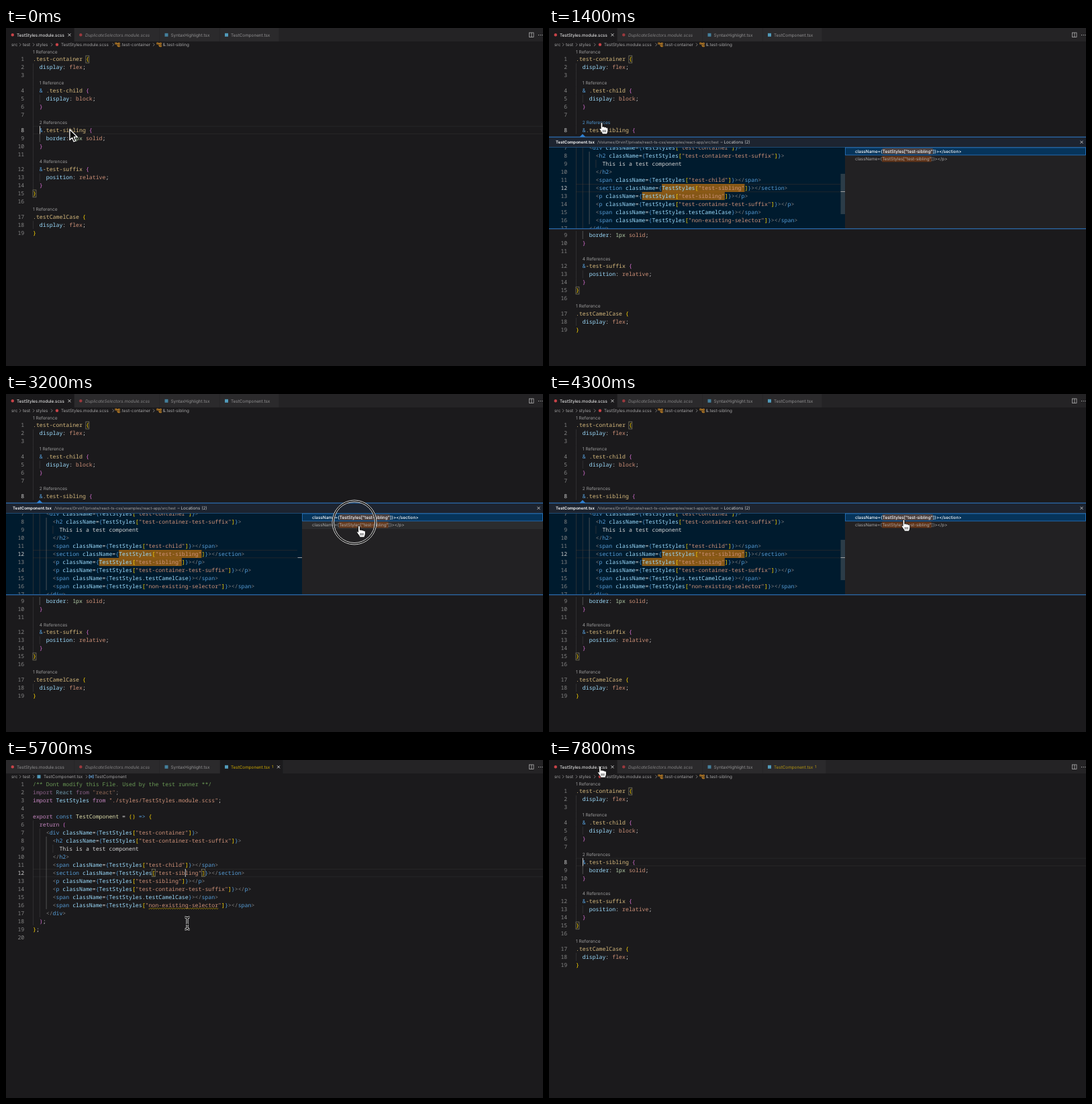
Write an HTML page with a canvas that moves like this. It is 800x503 px and loops after 8000 ms.

```html
<!DOCTYPE html>
<html lang="en">
<head>
<meta charset="utf-8">
<title>Peek references</title>
<style>
  html, body { margin: 0; width: 100%; height: 100%; overflow: hidden; background: #1b1a1c; }
  canvas { display: block; width: 100vw; height: 100vh; }
</style>
</head>
<body>
<canvas></canvas>
<script>
const W = 800, H = 503, LOOP = 8000;
const LINE = 12, LENS = 10.6, COL = 4.93, LEFT = 40, PEEK_GAP = 144.2;
const PEEK_OPEN = 1000, PEEK_FOCUS = 5200, FILE_OPEN = 5600, FILE_BACK = 7600;
const CLICKS = [800, 2800, 5200, 7100];
const MONO = '8.22px "Noto Sans Mono", monospace';
const BG = '#1b1a1c', BLUE = '#2f7fd0';

const canvas = document.querySelector('canvas');
const ctx = canvas.getContext('2d');
const ratio = window.devicePixelRatio || 1;
canvas.width = W * ratio;
canvas.height = H * ratio;
ctx.scale(ratio, ratio);
ctx.textRendering = 'geometricPrecision';

// Code is marked up with ^ and a colour letter.
const COLORS = {
  s: '#d7ba7d', k: '#569cd6', p: '#9cdcfe', v: '#ce9178', n: '#b5cea8', w: '#d4d4d4',
  y: '#ffd700', m: '#da70d6', g: '#808080', c: '#6a9955', i: '#c586c0', f: '#dcdcaa',
  I: '#8d628a', P: '#719caf', V: '#936a57', W: '#979797'
};

// Rows that start with @ are reference lenses and carry no line number.
const STYLES = [
  '@1 Reference',
  '^s.test-container ^y{',
  '  ^pdisplay^w: ^vflex^w;',
  '',
  '  @1 Reference',
  '  ^k& ^s.test-child ^m{',
  '    ^pdisplay^w: ^vblock^w;',
  '  ^m}',
  '',
  '  @2 References',
  '  ^k&^s.test-sibling ^m{',
  '    ^pborder^w: ^n1px ^vsolid^w;',
  '  ^m}',
  '',
  '  @4 References',
  '  ^k&^s-test-suffix ^m{',
  '    ^pposition^w: ^vrelative^w;',
  '  ^m}',
  '^y}',
  '',
  '@1 Reference',
  '^s.testCamelCase ^y{',
  '  ^pdisplay^w: ^vflex^w;',
  '^y}'
];

const key = name => `^y[^v"${name}"^y]`;
const open = (tag, access) => `^g<^k${tag} ^pclassName^w=^k{^pTestStyles${access}^k}^g>`;
const close = tag => `^g</^k${tag}^g>`;
const element = (tag, access) => '      ' + open(tag, access) + close(tag);

const COMPONENT = [
  '^c/** Dont modify this File. Used by the test runner **/',
  '^Iimport ^PReact ^Ifrom ^V"react"^W;',
  '^iimport ^pTestStyles ^ifrom ^v"./styles/TestStyles.module.scss"^w;',
  '',
  '^iexport ^kconst ^fTestComponent ^w= ^y() ^k=> ^y{',
  '  ^ireturn ^m(',
  '    ' + open('div', key('test-container')),
  '      ' + open('h2', key('test-container-test-suffix')),
  '        ^wThis is a test component',
  '      ' + close('h2'),
  element('span', key('test-child')),
  element('section', key('test-sibling')),
  element('p', key('test-sibling')),
  element('p', key('test-container-test-suffix')),
  element('span', '^w.^ptestCamelCase'),
  element('span', key('non-existing-selector')),
  '    ' + close('div'),
  '  ^m)^w;',
  '^y}^w;',
  ''
];

function rect(x, y, w, h, color) {
  ctx.fillStyle = color;
  ctx.fillRect(x, y, w, h);
}

function frame(x, y, w, h, color) {
  ctx.strokeStyle = color;
  ctx.lineWidth = 0.7;
  ctx.strokeRect(x, y, w, h);
}

function lines(color, width, ...paths) {
  ctx.strokeStyle = color;
  ctx.lineWidth = width;
  ctx.beginPath();
  for (const [x, y, ...rest] of paths) {
    ctx.moveTo(x, y);
    for (let i = 0; i < rest.length; i += 2) ctx.lineTo(rest[i], rest[i + 1]);
  }
  ctx.stroke();
}

function label(text, x, y, color, size = 6.35, style = '') {
  ctx.font = `${style} ${size}px Inter, sans-serif`;
  ctx.fillStyle = color;
  ctx.fillText(text, x, y + size * 0.36);
  return x + ctx.measureText(text).width;
}

function cross(x, y, color) {
  lines(color, 0.9, [x - 2, y - 2, x + 2, y + 2], [x + 2, y - 2, x - 2, y + 2]);
}

function codeLine(row, x, y) {
  const [indent, ...tokens] = row.split('^');
  let col = indent.length;
  ctx.font = MONO;
  for (const token of tokens) {
    ctx.fillStyle = COLORS[token[0]];
    ctx.fillText(token.slice(1), x + col * COL, y + 2.7);
    col += token.length - 1;
  }
}

function lineNumber(n, y, active) {
  ctx.font = MONO;
  ctx.textAlign = 'right';
  ctx.fillStyle = active ? '#d0d0d0' : '#858585';
  ctx.fillText(n, 27.3, y + 2.7);
  ctx.textAlign = 'left';
}

function guides(depth, top, height, bright) {
  for (let i = 0; i < depth; i++)
    rect(LEFT + i * 2 * COL, top, 0.7, height, i === bright ? '#666' : '#39383a');
}

const bracketBox = (col, y) => frame(LEFT + col * COL, y - 5.4, COL, 10.8, '#858268');
const caret = (x, y) => rect(x, y - 6, 1, 12, '#c8c8c8');

function currentLine(y, right) {
  rect(LEFT, y - 6, right - LEFT, 0.7, '#2b2a2c');
  rect(LEFT, y + 5.5, right - LEFT, 0.7, '#2b2a2c');
}

function stylesEditor(peek, hoverLens, caretOn) {
  let top = 30, number = 0, depth = 0;
  for (const row of STYLES) {
    const isLens = row.trim()[0] === '@';
    const height = isLens ? LENS : LINE;
    const y = top + height / 2;
    if (row) depth = row.search(/\S/) / 2;
    if (!isLens) number++;
    if (number === 8 && !isLens && !peek) currentLine(y, W);
    guides(depth, top, height, number === 9 ? 1 : -1);
    if (isLens) {
      const hovered = hoverLens && row.includes('2 R');
      label(row.trim().slice(1), LEFT + depth * 2 * COL, y, hovered ? '#4e94ce' : '#999', 6.65);
    } else {
      lineNumber(number, y, number === 8);
      if (number === 1) bracketBox(16, y);
      if (number === 15) bracketBox(0, y);
      codeLine(row, LEFT, y);
      if (number === 8 && caretOn) caret(50, y);
    }
    top += height;
    if (peek && number === 8 && !isLens) top += PEEK_GAP;
  }
}

function squiggle(x, y, width) {
  ctx.strokeStyle = '#cca700';
  ctx.lineWidth = 0.7;
  ctx.beginPath();
  for (let i = 0; i <= width; i += 0.5) ctx.lineTo(x + i, y + 0.8 * Math.sin(i * 1.8));
  ctx.stroke();
}

function componentEditor(firstY, right, focused, caretOn, matches) {
  let depth = 0;
  COMPONENT.forEach((row, i) => {
    const number = i + 1, y = firstY + i * LINE;
    depth = row ? row.search(/\S/) / 2 : 0;
    if (number === 12) currentLine(y, right);
    guides(depth, y - 6, LINE, 2);
    const matchCol = { 12: 26, 13: 20 }[number];
    if (matches && matchCol)
      rect(LEFT + matchCol * COL, y - 6, 25 * COL, LINE, 'rgba(255,143,0,.52)');
    lineNumber(number, y, number === 12);
    if (number === 12 && focused) {
      bracketBox(36, y);
      bracketBox(51, y);
    }
    codeLine(row, LEFT, y);
    if (number === 12 && caretOn) caret(LEFT + 46 * COL, y);
    if (number === 16 && focused) squiggle(LEFT + 35 * COL, y + 5, 21 * COL);
  });
}

function resultRow(y, tag, color, style) {
  const head = label('className={', 456, y, color, 6.4, style);
  const match = 'TestStyles["test-sibling"';
  rect(head, y - 4.5, ctx.measureText(match).width, 9, 'rgba(234,92,0,.3)');
  const tail = label(match, head, y, color, 6.4, style);
  label(`]}></${tag}>`, tail, y, color, 6.4, style);
}

function peekView(t) {
  const focused = t >= PEEK_FOCUS;
  ctx.fillStyle = BLUE;
  ctx.beginPath();
  ctx.moveTo(45.5, 162.2);
  ctx.lineTo(50, 157.8);
  ctx.lineTo(54.5, 162.2);
  ctx.fill();
  rect(0, 162, W, 137, '#1d2430');
  label('TestComponent.tsx', 10, 169.8, '#fff', 6.1, '600');
  label('/Volumes/OrvinT/private/react-ts-css/examples/react-app/src/test', 72, 169.8, '#a0a0a0', 5.75);
  label('– Locations (2)', 255.5, 169.8, '#ccc', 6.3);
  cross(793.5, 169.8, '#ccc');

  ctx.save();
  ctx.beginPath();
  ctx.rect(0, 177.5, 441, 121);
  ctx.clip();
  rect(0, 177, 441, 122, '#001b2e');
  componentEditor(106, 434, focused, false, true);
  if (t < 2300 || t > 3400) rect(434.5, 217, 6.5, 60, 'rgba(121,121,121,.36)');
  rect(434.5, 243, 6.5, 1, '#a0a0a0');
  if (focused) rect(437, 267, 4, 6, '#b58a22');
  ctx.restore();

  rect(441, 177, 359, 122, '#222123');
  rect(441, 177.7, 359, 11.6, focused ? '#37363b' : '#06345a');
  if (t > 2500 && t < 4000) rect(441, 189.5, 359, 11.5, '#2b2c2e');
  rect(0, 161.7, W, 1, BLUE);
  rect(0, 177, W, 0.8, '#225785');
  rect(0, 298.3, W, 1, BLUE);
  if (!focused) frame(441.5, 178, 358, 11, BLUE);
  resultRow(183.3, 'section', focused ? '#ccc' : '#fff', focused ? '' : '500');
  resultRow(194.8, 'p', '#aaa', '');
}

function dot(x, y, color) {
  ctx.fillStyle = color;
  ctx.beginPath();
  ctx.arc(x, y, 2.2, 0, Math.PI * 2);
  ctx.fill();
}

function tabs(component, warned) {
  const end = warned ? 413 : 407;
  rect(0, 0, W, 20, '#242325');
  const cells = [[0, 102, !component], [102, 229], [229, 319], [319, end, component]];
  for (const [left, right, active] of cells)
    rect(left, 0, right - left - 0.6, 20, active ? BG : '#2b2a2c');
  dot(9.8, 10.3, '#c74348');
  dot(111.3, 10.3, '#9b393e');
  rect(236.5, 7.8, 5, 5, '#447f9b');
  rect(326, 7.8, 5, 5, '#519aba');
  label('TestStyles.module.scss', 16, 10.3, component ? '#929192' : '#fff');
  label('DuplicateSelectors.module.scss', 118, 10.3, '#858485', 6.35, 'italic');
  label('SyntaxHighlight.tsx', 245.5, 10.3, '#929192');
  const color = warned ? (component ? '#cca700' : '#b39410') : '#929192';
  label('TestComponent.tsx', 335, 10.3, color);
  if (warned) label('1', 396, 10.3, color, 5.8);
  component ? cross(406, 10.3, '#ddd') : cross(94.5, 10.3, '#ddd');
  frame(779.5, 7, 6.5, 6.5, '#c5c5c5');
  lines('#c5c5c5', 0.7, [782.8, 7, 782.8, 13.5]);
  for (const x of [793, 795.7, 798.4]) rect(x, 10, 1, 1, '#c5c5c5');
}

function selectorIcon(x) {
  lines('#ee9d28', 0.8, [x - 1, 23, x + 1.5, 23], [x, 23, x, 27, x + 1.5, 27]);
  for (const [dx, dy] of [[-2.2, 23], [2.3, 23.2], [2.3, 26.8]]) frame(x + dx - 1, dy - 1, 2, 2, '#ee9d28');
}

function variableIcon(x) {
  const c = '#75beff';
  lines(c, 0.8, [x - 2, 22.5, x - 3, 22.5, x - 3, 27, x - 2, 27], [x + 2, 22.5, x + 3, 22.5, x + 3, 27, x + 2, 27]);
  frame(x - 1, 23.8, 2, 2, c);
}

function breadcrumbs(component) {
  const parts = component
    ? [[8, 'src'], [25, 'test'], [56, 'TestComponent.tsx'], [132, 'TestComponent']]
    : [[8, 'src'], [25, 'test'], [44.5, 'styles'], [82, 'TestStyles.module.scss'],
       [171, '.test-container'], [233.5, '&.test-sibling']];
  for (const [x, text] of parts) label(text, x, 24.7, '#a5a4a5');
  const chevrons = component ? [21, 41, 120] : [21, 41, 68, 159.5, 220];
  for (const x of chevrons) lines('#888', 0.8, [x - 1, 22.5, x + 1.2, 24.8, x - 1, 27.1]);
  if (component) {
    rect(46.5, 22.3, 5, 5, '#519aba');
    variableIcon(127);
  } else {
    dot(76, 24.7, '#c74348');
    selectorIcon(166);
    selectorIcon(228);
  }
}

// Pointer keyframes: time, x, y of the hot spot.
const PATH = [
  [0, 95, 151], [300, 95, 151], [800, 78.5, 140.7], [1600, 78.5, 140.7], [2700, 519, 191], [2800, 519, 191],
  [3200, 526, 196], [3700, 529, 193], [4300, 528.5, 187], [4500, 528.5, 187], [5150, 268, 240],
  [5250, 268, 240], [5400, 270, 243], [5800, 270, 243], [6700, 147.5, 0], [7100, 76, 9], [8000, 76, 9]
];

function pointerAt(t) {
  const i = Math.max(1, PATH.findIndex(p => p[0] >= t));
  const [t0, x0, y0] = PATH[i - 1], [t1, x1, y1] = PATH[i];
  const u = (t - t0) / (t1 - t0), e = u * u * (3 - 2 * u);
  return [x0 + (x1 - x0) * e, y0 + (y1 - y0) * e];
}

const ARROW = new Path2D('M0 0V15.5L3.6 12.2L6 18L8.7 16.8L6.3 11.2H11.3Z');
const HAND = new Path2D('M-1.4 1.5C-1.4-.5 1.4-.5 1.4 1.5V6.5C2.2 5.6 4.1 5.8 4.3 7C5.2 6.3 6.8 6.6 7 7.8' +
  'C8 7.2 9.4 7.8 9.4 9.2V12C9.4 14 8.4 15 8 17.2H1C.6 15-1.4 13-3 10.5C-4 8.9-2.6 8-1.6 9L-1.4 9.4Z');
const IBEAM = new Path2D('M-3.5-9Q0-9 0-6.5Q0-9 3.5-9M0-6.5V6.5M-3.5 9Q0 9 0 6.5Q0 9 3.5 9M-2 1.5H2');

function pointer(t) {
  const [x, y] = pointerAt(t);
  const kind = [[700, 'arrow'], [1750, 'hand'], [2450, 'arrow'], [4700, 'hand'],
    [6500, 'ibeam'], [6850, 'arrow'], [LOOP, 'hand']].find(([end]) => t < end)[1];
  ctx.save();
  ctx.translate(x, y);
  ctx.lineJoin = 'round';
  if (kind === 'ibeam') {
    ctx.strokeStyle = '#fff';
    ctx.lineWidth = 3;
    ctx.stroke(IBEAM);
    ctx.strokeStyle = '#000';
    ctx.lineWidth = 1.3;
    ctx.stroke(IBEAM);
  } else {
    const arrow = kind === 'arrow';
    const path = arrow ? ARROW : HAND;
    ctx.fillStyle = arrow ? '#000' : '#fff';
    ctx.strokeStyle = arrow ? '#fff' : '#000';
    ctx.lineWidth = arrow ? 1.3 : 0.9;
    ctx.fill(path);
    ctx.stroke(path);
    if (!arrow) lines('#000', 0.7, [2, 11, 2, 14.5], [4, 11, 4, 14.5], [6, 11, 6, 14.5]);
  }
  ctx.restore();
}

function clickRing(t) {
  const start = CLICKS.find(c => t >= c && t - c < 450);
  if (start === undefined) return;
  const [x, y] = pointerAt(start);
  const radius = Math.min(33, 4 + (t - start) * 0.0725);
  const circle = (r, width, color) => {
    ctx.strokeStyle = color;
    ctx.lineWidth = width;
    ctx.beginPath();
    ctx.arc(x, y, r, 0, Math.PI * 2);
    ctx.stroke();
  };
  circle(radius - 1.2, 3, '#111');
  circle(radius, 0.9, '#eee');
  circle(radius - 2.5, 0.9, '#eee');
}

function draw(t) {
  const component = t >= FILE_OPEN && t < FILE_BACK;
  const peek = t >= PEEK_OPEN && t < FILE_OPEN;
  const blinkStart = component ? FILE_OPEN : t >= FILE_BACK ? FILE_BACK : 0;
  const caretOn = !peek && (t - blinkStart) % 1000 < 500;
  rect(0, 0, W, H, BG);
  if (component) componentEditor(36, W, true, caretOn, false);
  else stylesEditor(peek, t > 700 && t < 1700, caretOn);
  if (peek) peekView(t);
  tabs(component, t >= FILE_OPEN);
  breadcrumbs(component);
  clickRing(t);
  pointer(t);
}

function tick() {
  draw(performance.now() % LOOP);
  requestAnimationFrame(tick);
}
tick();
</script>
</body>
</html>
```
